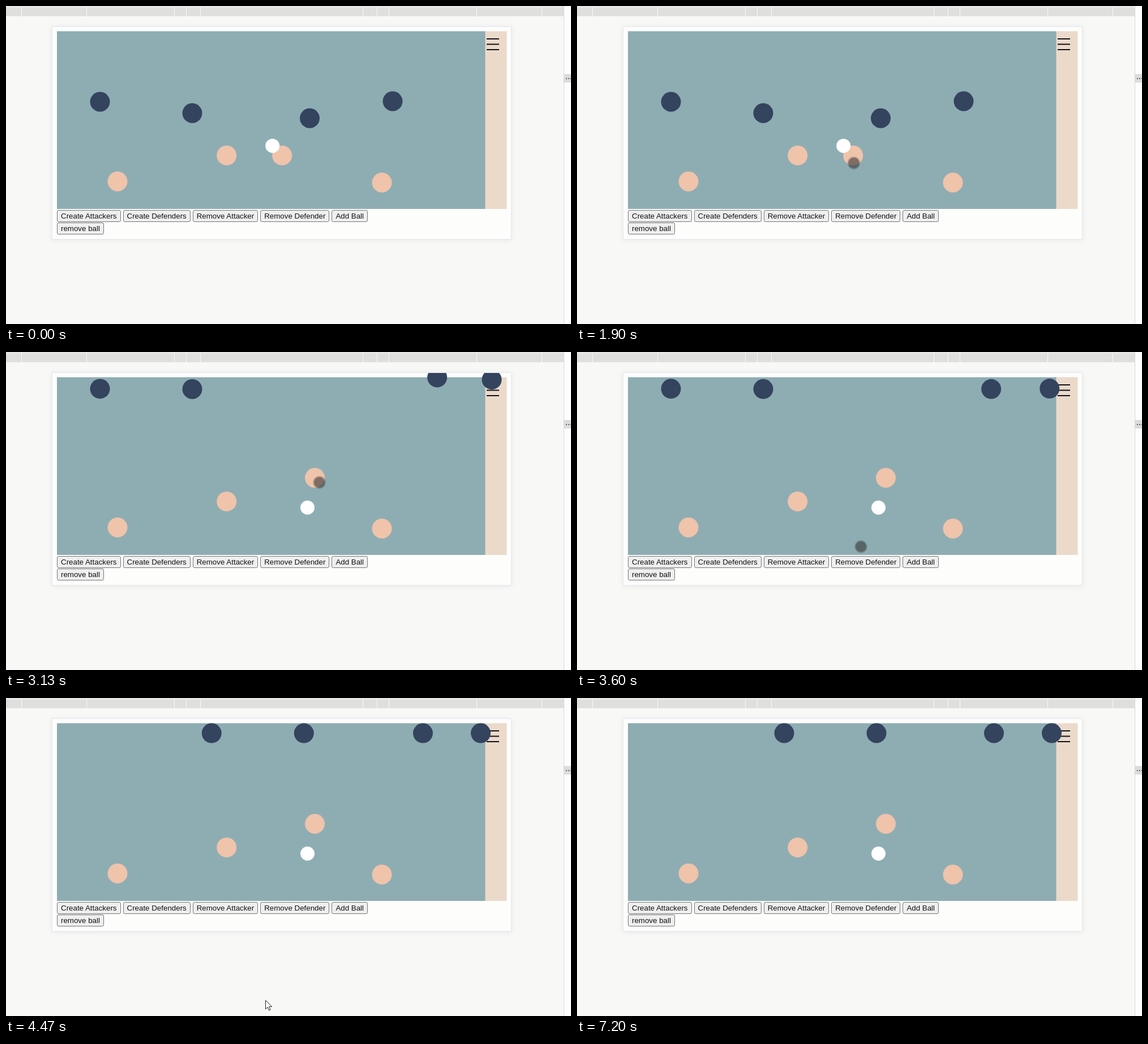
Animation, 998 px wide and 561 px high, one loop 7.27 s. Source, as an HTML page:

```html
<!DOCTYPE html>
<html>
<head>
<meta charset="utf-8">
<style>
  html, body { margin: 0; width: 100%; height: 100%; overflow: hidden; background: #f8f8f6; }
  svg { display: block; width: 998px; height: 561px; }
  .buttons { display: flex; flex-wrap: wrap; gap: 1px 4px; width: 600px; }
  button {
    height: 21px; padding: 1px 6px; border: 1px solid #767676; border-width: 1.5px; border-radius: 3px;
    background: #efefef; color: #111; font: 13.333px Arial, "Liberation Sans", sans-serif;
  }
  .card { fill: #fdfdfc; stroke: #e7e7ef; filter: drop-shadow(0 1px 5px rgba(0, 0, 0, .07)); }
  .held { filter: drop-shadow(5px 5px 2.5px #000); }
</style>
</head>
<body>
<svg viewBox="0 0 998 561">
  <defs>
    <clipPath id="screen"><rect x="82" y="37" width="810" height="374"/></clipPath>
    <radialGradient id="glow">
      <stop offset=".72" stop-color="#333" stop-opacity=".6"/>
      <stop offset="1" stop-color="#333" stop-opacity=".12"/>
    </radialGradient>
  </defs>
  <rect width="985" height="1" fill="#dadada"/>
  <rect y="2" width="985" height="16" fill="#dfdfdd"/>
  <g id="ticks" fill="#fafafa"></g>
  <rect x="986" width="12" height="561" fill="#fdfdfd"/>
  <path d="M985.5 0V561" stroke="#d8d8e4"/>
  <rect x="986" y="120" width="12" height="15" fill="#dcdcdc"/>
  <path d="M989 128h2m2 0h2m2 0h2" stroke="#666" stroke-width="2"/>
  <rect class="card" x="81.5" y="36.5" width="811" height="375"/>
  <foreignObject x="90" y="360" width="600" height="50">
    <div class="buttons">
      <button>Create Attackers</button>
      <button>Create Defenders</button>
      <button>Remove Attacker</button>
      <button>Remove Defender</button>
      <button>Add Ball</button>
      <button>remove ball</button>
    </div>
  </foreignObject>
  <g clip-path="url(#screen)">
    <rect x="90" y="44.5" width="757" height="313.5" fill="#8eadb3"/>
    <rect x="846.5" y="44.5" width="38" height="313.5" fill="#ebdaca"/>
    <path d="M849 58h22m-22 9.5h22m-22 9.5h22" stroke="#10101a" stroke-width="2.2"/>
    <g id="players"></g>
    <circle id="touch" r="11.5" fill="url(#glow)"/>
  </g>
  <path id="arrow" d="M.5 .5V16.2L4.2 12.8 6.6 18.4 9 17.4 6.6 11.9H11.6Z" fill="#fff" stroke="#222"/>
</svg>
<script>
const LOOP = 7270, GRAB = 2150, DROP = 2830;
const $ = id => document.getElementById(id);

function add(parent, tag, attrs) {
  const el = document.createElementNS('http://www.w3.org/2000/svg', tag);
  for (const key in attrs) el.setAttribute(key, attrs[key]);
  return parent.appendChild(el);
}
const disc = (r, fill) => add($('players'), 'circle', { r, fill });
const team = (homes, fill) => homes.map(home => {
  const el = disc(17.5, fill);
  place(el, home);
  return { el, home };
});
function place(el, [x, y]) {
  el.setAttribute('cx', x);
  el.setAttribute('cy', y);
}
function show(el, visible) {
  el.style.display = visible ? '' : 'none';
}

const ramp = (t, from, to) => Math.min(1, Math.max(0, (t - from) / (to - from)));
const easeOut = (p, power) => 1 - (1 - p) ** power;
const mix = ([x0, y0], [x1, y1], px, py = px) => [x0 + (x1 - x0) * px, y0 + (y1 - y0) * py];

// Underdamped spring: stiffness 100, damping 10, mass 1
function spring(ms) {
  if (ms <= 0) return 0;
  const s = ms / 1000, w = Math.sqrt(75);
  return 1 - Math.exp(-5 * s) * (Math.cos(w * s) + 5 / w * Math.sin(w * s));
}

// The pointer enters from below, leads the drag, then leaves downwards
function pointerAt(t) {
  const press = [489, 277], release = [553.5, 230];
  if (t < 2050) return mix([470, 570], press, ramp(t, 1050, 1800));
  if (t < 3200) return mix(press, release, ramp(t, 2050, 2645));
  const p = ramp(t, 3200, 5000);
  return mix(release, [455.5, 590], easeOut(p, 3), easeOut(p, 1.5));
}

for (const x of [27, 142, 297, 318, 343])
  for (const side of [x, 973 - x]) add($('ticks'), 'rect', { x: side, y: 2, width: 1, height: 16 });

const defenders = team([[166, 169], [329, 189], [536.5, 198], [683, 168]], '#34435e');
const attackers = team([[197, 309.5], [389.7, 263.7], [487.7, 263.7], [664, 311.5]], '#f0c3ab');
const runner = attackers[2];
const ball = disc(12.5, '#fff');

function draw(now) {
  const t = now % LOOP;
  defenders.forEach(({ el, home }, i) => {
    // The first pair rises before sliding across; the others go diagonally
    const wide = i < 2;
    const goal = [Math.min(home[0] + 200, 838.5), 62];
    place(el, mix(home, goal, spring(t - DROP - (wide ? 790 : 0)), spring(t - DROP - (wide ? 68 : 0))));
  });

  const spot = mix(runner.home, [545.5, 222], ramp(t, GRAB, 2700));
  place(runner.el, spot);
  runner.el.setAttribute('class', t >= GRAB && t < DROP ? 'held' : '');
  place(ball, mix([spot[0] - 17, spot[1] - 17], [532.5, 274.5], ramp(t, DROP, 3100)));

  const pointer = pointerAt(t);
  const inside = pointer[1] < 411;
  place($('touch'), pointer);
  $('arrow').setAttribute('transform', `translate(${pointer})`);
  show($('touch'), inside);
  show($('arrow'), !inside);
  requestAnimationFrame(draw);
}
requestAnimationFrame(draw);
</script>
</body>
</html>
```
